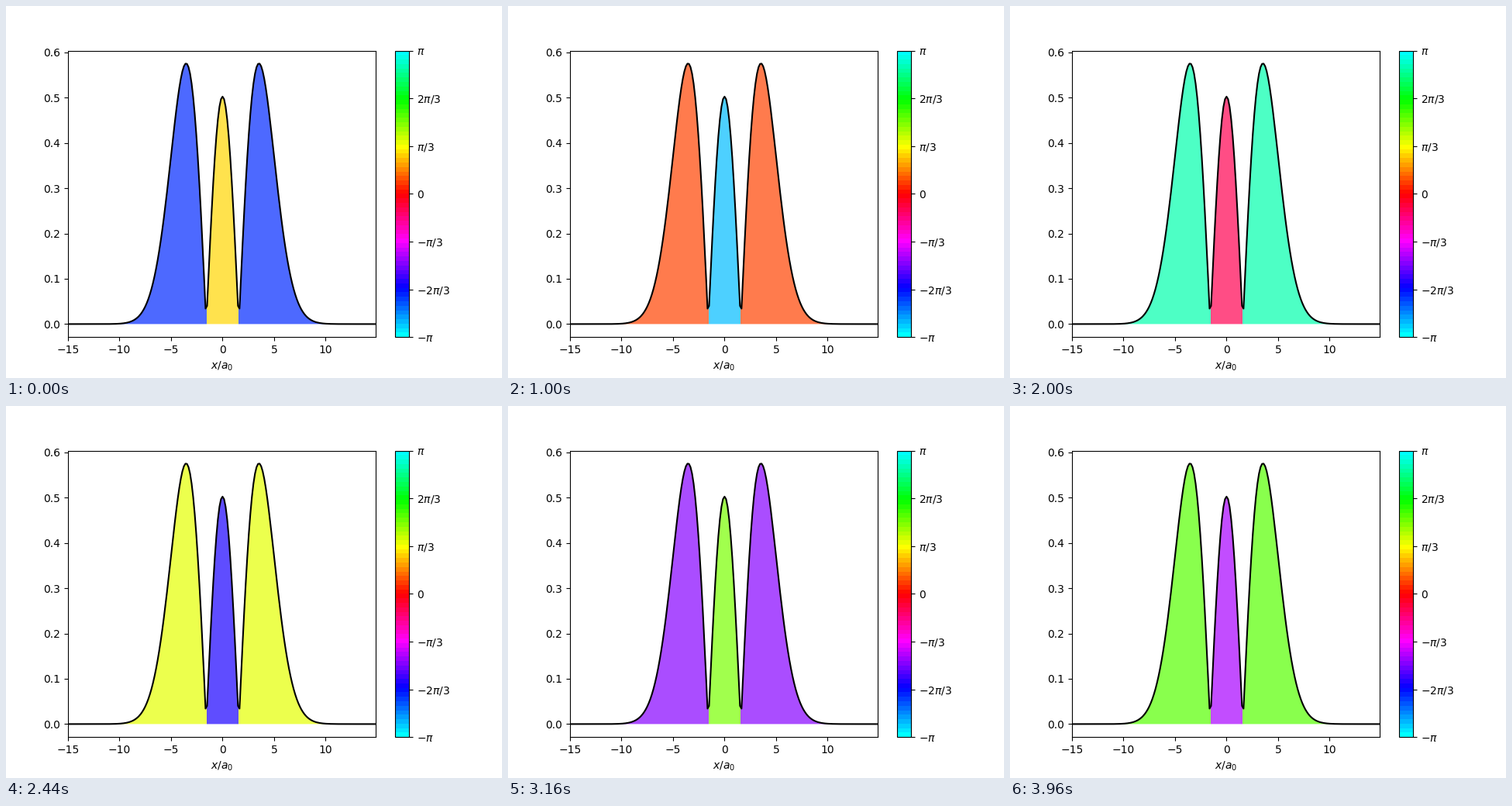
These frames come from a looping animation (640x480 px, 4000 ms). A matplotlib script:

```python
import numpy as np
import matplotlib.pyplot as plt
from matplotlib.animation import FuncAnimation
from matplotlib.cm import ScalarMappable
from matplotlib.colors import ListedColormap, Normalize, hsv_to_rgb

FRAMES, INTERVAL = 100, 40
PHASE_START, PHASE_STEP = -2.26, -0.15
BANDS = 64


def phase_rgb(phase):
    """Hue wheel with red at phase zero."""
    hue = np.mod(phase / (2 * np.pi), 1.0)
    one = np.ones_like(hue)
    return hsv_to_rgb(np.stack([hue, one, one], axis=-1))


# Second excited state of the harmonic oscillator, length scale sqrt(5)
x = -15 + 0.15 * np.arange(200)
xi2 = x**2 / 5
psi = (np.pi * np.sqrt(5) ** 2 * np.pi / np.pi) ** -0.25 * (2 * xi2 - 1) * np.exp(-xi2 / 2)
amp = np.abs(psi)
top = amp.max()

fig, ax = plt.subplots(figsize=(6.4, 4.8), dpi=100)

wheel = ListedColormap(phase_rgb(np.linspace(-np.pi, np.pi, BANDS)))
bar = fig.colorbar(ScalarMappable(Normalize(-np.pi, np.pi), wheel), ax=ax)
bar.set_ticks(
    np.arange(-3, 4) * np.pi / 3,
    labels=[r"$-\pi$", r"$-2\pi/3$", r"$-\pi/3$", "$0$",
            r"$\pi/3$", r"$2\pi/3$", r"$\pi$"],
)

# Phase colours, cut to the area under the curve
fill = ax.imshow(
    np.ones((1, x.size, 3)), extent=(x[0], x[-1], -0.05 * top, 1.05 * top),
    aspect="auto", interpolation="nearest", alpha=0.7, zorder=1,
)
area, = ax.fill(np.r_[x[0], x, x[-1]], np.r_[0, amp, 0], fc="none", ec="none")
fill.set_clip_path(area)
ax.plot(x, amp, color="black", lw=1.5)

ax.set_xlim(x[0], x[-1])
ax.set_ylim(-0.05 * top, 1.05 * top)
ax.set_xlabel("$x/a_0$")


def update(i):
    phase = PHASE_START + PHASE_STEP * i + np.where(psi < 0, np.pi, 0.0)
    fill.set_data(phase_rgb(phase)[np.newaxis])
    return fill,


anim = FuncAnimation(fig, update, frames=FRAMES, interval=INTERVAL,
                     repeat=True, repeat_delay=0)
plt.show()
```
